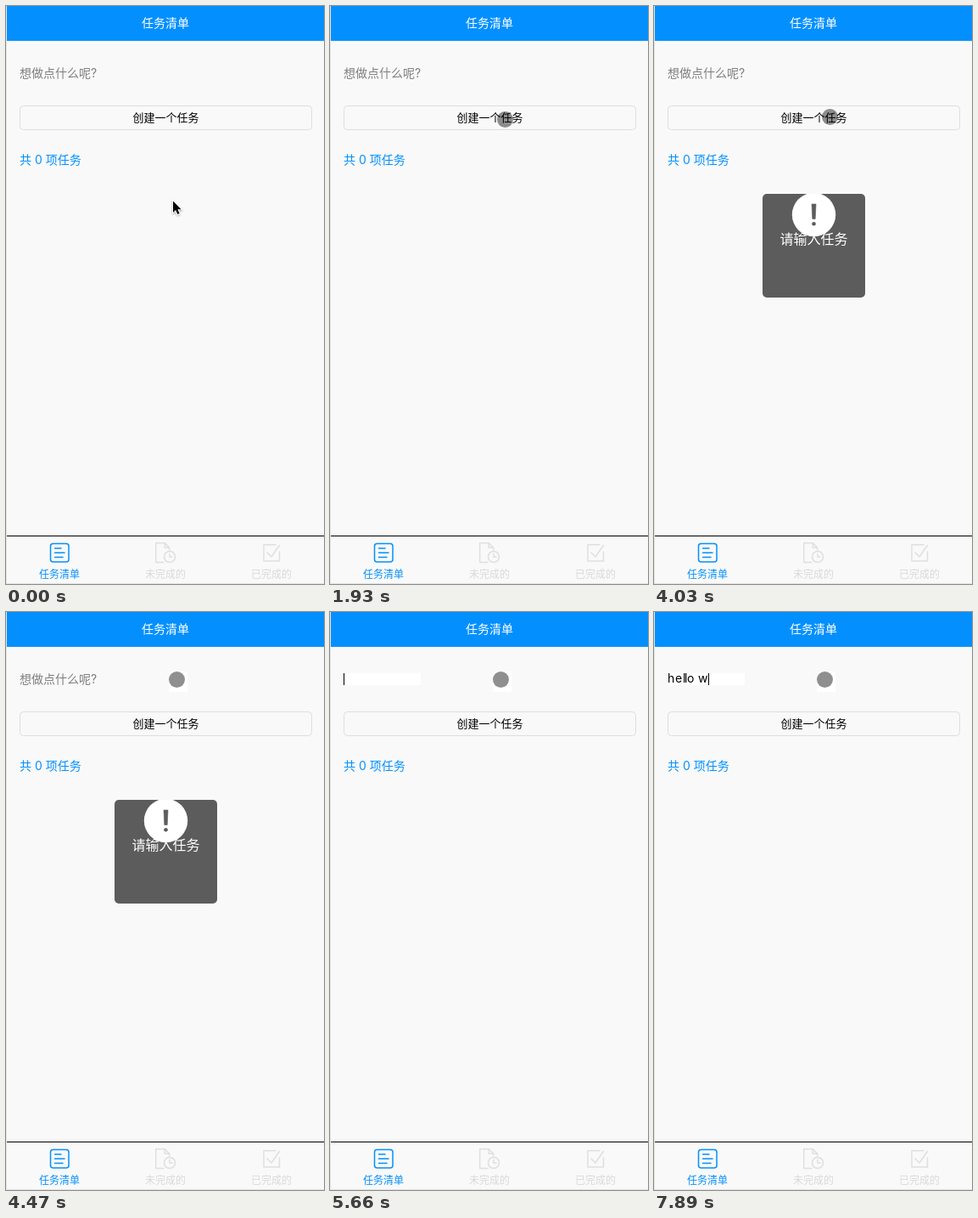
An HTML page that plays this animation: 375 by 680 pixels, repeating every 8 s.

```html
<!DOCTYPE html>
<html lang="zh-CN">
<head>
<meta charset="utf-8">
<title>任务清单</title>
<style>
  html, body { margin: 0; width: 100%; height: 100%; overflow: hidden; background: #f9f9f9; }
  svg { display: block; width: 375px; height: 680px; }
  text { font-family: Inter, "Noto Sans CJK SC", "Noto Sans CJK", sans-serif; font-size: 14px; white-space: pre; }
  .mid { text-anchor: middle; }
  .line { fill: none; stroke-width: 1.5; stroke-linecap: round; stroke-linejoin: round; }
  .tab { font-size: 12px; text-anchor: middle; }
</style>
</head>
<body>
<svg viewBox="0 0 375 680">
  <defs>
    <clipPath id="box"><rect x="128" y="221" width="121" height="122" rx="5"/></clipPath>
    <filter id="shade" x="-50%" y="-50%" width="200%" height="200%">
      <feDropShadow dx="0" dy="1" stdDeviation="0.9" flood-opacity="0.4"/>
    </filter>
  </defs>
  <rect width="375" height="680" fill="#f9f9f9"/>
  <rect x="1" width="374" height="41" fill="#0390fe"/>
  <text class="mid" x="188" y="25" fill="#fff" font-weight="500">任务清单</text>

  <rect id="field" x="16" y="72" width="91" height="14" fill="#fff"/>
  <text id="hint" x="16" y="84" fill="#7f7f7f">想做点什么呢?</text>
  <text id="typed" y="83" fill="#000"></text>
  <rect id="caret" y="72" width="1" height="14" fill="#000"/>

  <rect x="16.5" y="117.5" width="344" height="28" rx="4" fill="#f9f9f9" stroke="#dedede"/>
  <text class="mid" x="188.5" y="136" font-size="13" style="font-size:13px">创建一个任务</text>
  <text x="16" y="186" fill="#0390fe">共 0 项任务</text>

  <g id="toast" clip-path="url(#box)">
    <rect x="128" y="221" width="121" height="122" fill="#5c5c5c"/>
    <text class="mid" x="188.5" y="280" fill="#fff" style="font-size:16px">请输入任务</text>
    <circle cx="188.5" cy="245.5" r="25.7" fill="#fff"/>
    <path d="M186 233H191L190.2 250.500H186.800Z" fill="#5c5c5c" stroke="#5c5c5c" stroke-width=".6" stroke-linejoin="round"/>
    <circle cx="188.500" cy="256.300" r="2.300" fill="#5c5c5c"/>
  </g>

  <rect x="1" y="623" width="374" height="1" fill="#000"/>
  <g class="line" stroke="#0390fe">
    <rect x="52.500" y="632.500" width="21.500" height="21.500" rx="3"/>
    <path d="M57.500 638H65M57.500 643.300H69M57.500 648.500H67"/>
  </g>
  <g class="line" stroke="#dfdfdf">
    <path d="M186 654.500H176.700V631.700H187.300L192.700 637.300V640M187.300 631.700V637.300H192.700"/>
    <circle cx="193" cy="648" r="6.500"/>
    <path d="M193 644.500V648.300H196"/>
  </g>
  <g class="line" stroke="#dfdfdf">
    <path d="M318 633.700H304V653H322.500V642"/>
    <path d="M308 643L313 648L322.500 634.500"/>
  </g>
  <text class="tab" x="63" y="672.500" fill="#0390fe">任务清单</text>
  <text class="tab" x="188" y="672.500" fill="#d9d9d9">未完成的</text>
  <text class="tab" x="313" y="672.500" fill="#d9d9d9">已完成的</text>
  <path d="M.5 0V680M0 679.500H375" stroke="#e3e3e3"/>

  <rect id="halo" x="192" y="70" width="22" height="24" fill="#fff"/>
  <path id="arrow" d="M0 0V13.500L3.100 10.600L5.300 15.600L7.600 14.600L5.400 9.700H9.600Z"
    stroke="#fff" stroke-width="1.600" paint-order="stroke" filter="url(#shade)"/>
  <circle id="touch" r="9.500" fill="#000" fill-opacity=".44"/>
</svg>
<script>
const LOOP = 8000;
const PHRASE = 'hello w';
const STOPS = [16, 25, 34, 36, 39, 48, 52, 64];   // caret place after each letter

// Each step: [start ms, value...], held until the next one.
const ARROW = [[0, 197, 229.5], [150, 204, 140], [300, 206, 124], [450, 206, 125], [590, 207, 127], [740, 207, 133]];
const TOUCH = [[1930, 206.5, 133.5], [4030, 207.5, 130.5], [4180, 206.5, 102.5], [4330, 204.5, 84.5], [4470, 201.5, 79.5]];
const KEYS = [[0, 0], [6250, 1], [6550, 2], [7000, 3], [7150, 4], [7290, 5], [7440, 6], [7890, 7]];

const $ = id => document.getElementById(id);
const show = (id, on) => $(id).setAttribute('visibility', on ? 'visible' : 'hidden');
const stepAt = (steps, t) => steps.filter(s => s[0] <= t).pop();
const place = (id, step) => {
  show(id, step);
  if (step) $(id).setAttribute('transform', `translate(${step[1]} ${step[2]})`);
};

$('typed').setAttribute('x', STOPS.slice(0, -1).join(' '));

function draw(t) {
  const editing = t >= 5660;
  const count = stepAt(KEYS, t)[1];

  place('arrow', t < 1930 && stepAt(ARROW, t));
  place('touch', stepAt(TOUCH, t));
  show('halo', t >= 4470);
  show('toast', t >= 2080 && t < 5070);
  show('hint', !editing);
  show('field', editing);
  show('caret', editing && (t < 6110 || count > 0));
  $('caret').setAttribute('x', STOPS[count]);
  $('typed').textContent = PHRASE.slice(0, count);
}

const start = performance.now();
function tick() {
  draw((performance.now() - start) % LOOP);
  requestAnimationFrame(tick);
}
tick();
</script>
</body>
</html>
```
